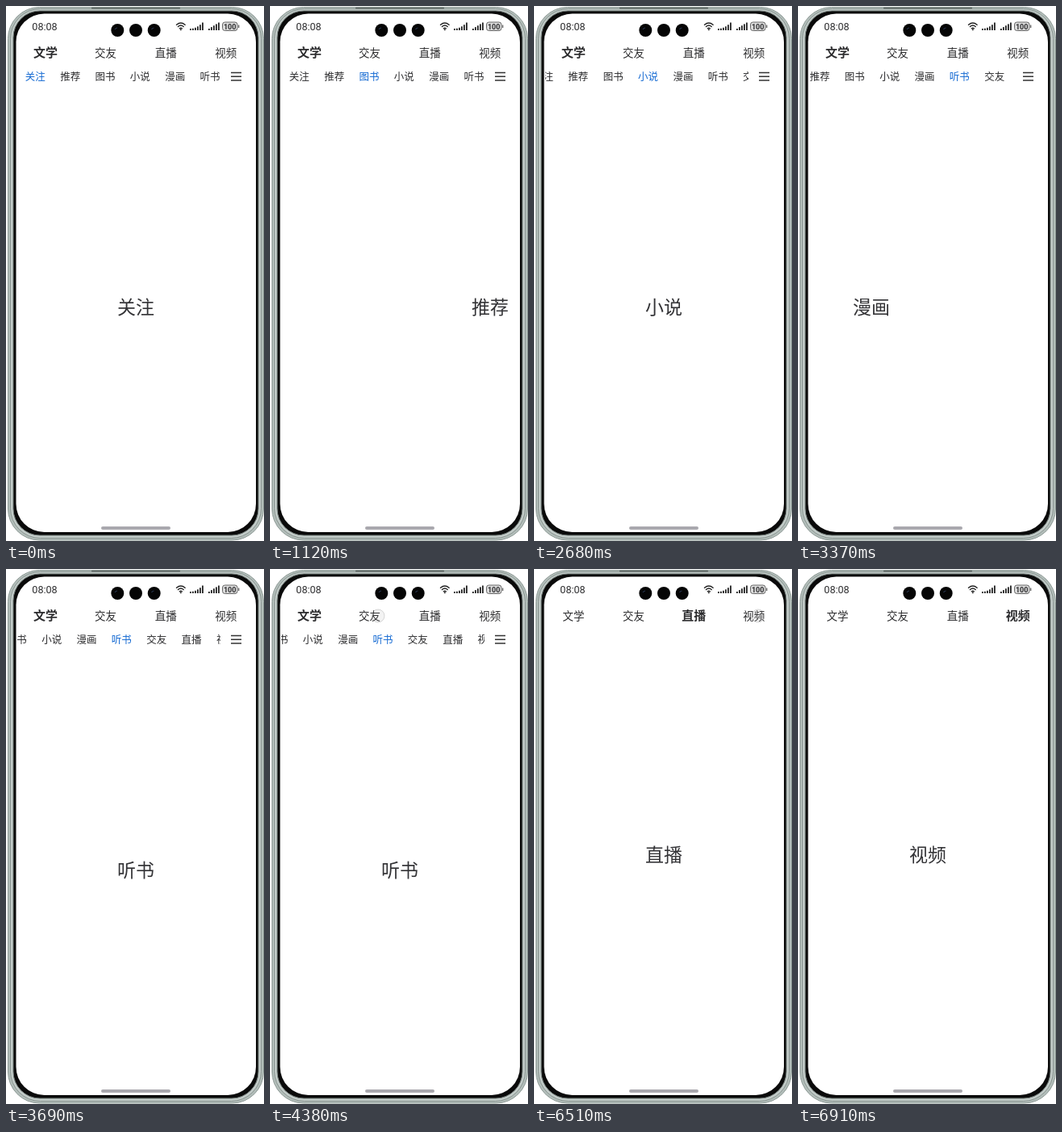
Recreate the animation shown at these times as an HTML page. Size 320 by 662 pixels, loop 7.87 s.

```html
<!DOCTYPE html>
<html lang="zh-CN">
<head>
<meta charset="utf-8">
<style>
  html, body { margin: 0; width: 100%; height: 100%; overflow: hidden; background: #fff; }
  svg { display: block; width: 320px; height: 662px; }
  text { font-family: "Noto Sans CJK SC", "Noto Sans CJK", "Noto Sans", sans-serif; text-anchor: middle; fill: #2c2c2e; }
  .status { font-family: Roboto, sans-serif; }
  .top { font-size: 13.5px; }
  .top.on { font-size: 15px; font-weight: 600; }
  .sub { font-size: 12.5px; }
  .sub.on { fill: #1268d2; }
  .title { font-size: 23px; fill: #333336; }
</style>
</head>
<body>
<svg viewBox="0 0 320 662">
  <defs>
    <clipPath id="screenClip"><rect x="12.5" y="9.5" width="297.5" height="641.5" rx="35"/></clipPath>
    <clipPath id="paneClip"><rect x="12" y="9" width="298" height="643"/></clipPath>
    <clipPath id="stripClip"><rect x="14" y="72" width="252" height="30"/></clipPath>
    <filter id="soft"><feGaussianBlur stdDeviation=".7"/></filter>
  </defs>

  <g id="body">
    <rect x="2.5" y="1.5" width="317" height="659.5" rx="39" fill="#b3beba" stroke="#8d9995"/>
    <rect x="5.5" y="3.5" width="311" height="655" rx="37" fill="#c3ccc9" stroke="#7b8783" stroke-width=".8"/>
    <rect x="9" y="6" width="304" height="649" rx="33" fill="#0a0a0a" stroke="#6d7673" filter="url(#soft)"/>
    <rect x="106" y="1.5" width="110" height="2.5" rx="1" fill="#6d7673"/>
    <rect x="12.5" y="9.5" width="297.5" height="641.5" rx="35" fill="#fff" filter="url(#soft)"/>
  </g>

  <g clip-path="url(#screenClip)">
    <g id="panes">
      <g clip-path="url(#paneClip)">
        <g clip-path="url(#stripClip)"><g id="strip"></g></g>
        <path d="M279 82.5h13M279 87.2h13M279 92h13" stroke="#333" stroke-width="1.4"/>
        <g id="pages"></g>
      </g>
    </g>
    <g id="topTabs"></g>
    <circle id="touch" r="8" fill="#888" fill-opacity=".1" stroke="#999" stroke-opacity=".45" stroke-width=".8"/>
  </g>

  <g id="statusBar">
    <text class="status" x="48" y="30" font-size="12.6">08:08</text>
    <g fill="#050505">
      <circle cx="138.3" cy="30" r="8"/><circle cx="161" cy="30" r="8"/><circle cx="183.7" cy="30" r="8"/>
    </g>
    <path d="M135 29a4 4 0 0 1 3-2M180.500 29a4 4 0 0 1 3-2" fill="none" stroke="#27344d" stroke-width="1.2"/>
    <path d="M211.500 23.200q5.300-4.600 10.600 0M213.400 25.600q3.400-3 6.800 0M215.300 27.800q1.500-1.300 3 0"
      fill="none" stroke="#222" stroke-width="1.4" stroke-linecap="round"/>
    <circle cx="216.800" cy="29.300" r="1" fill="#222"/>
    <g id="signal" fill="#222"></g>
    <rect x="268.500" y="20" width="18.500" height="10.500" rx="3" fill="#dcdcdc" stroke="#666"/>
    <path d="M288.700 23.500v3.500" stroke="#666" stroke-width="1.300"/>
    <text class="status" x="277.700" y="28.600" font-size="9" font-weight="600">100</text>
  </g>
  <rect x="118" y="644" width="86" height="4" rx="2" fill="#a9a8ae"/>
</svg>

<script>
const LOOP = 7870, FRAME = 40, WIDTH = 298, MID = 161;
const TOP = ['文学', '交友', '直播', '视频'];
const SUB = ['关注', '推荐', '图书', '小说', '漫画', '听书', ...TOP.slice(1)];

// [start ms, target tab]
const subMoves = [[40, 1], [480, 0], [1120, 2], [2360, 3], [3330, 5]];
const topMoves = [[4500, 1], [5600, 2], [6630, 3]];
// [shown from, hidden at, x, y]
const touches = [
  [440, 480, 40, 88], [840, 1120, 127, 88], [1940, 2360, 169, 88], [3170, 3330, 231, 88],
  [4260, 4500, 134, 58], [5400, 5600, 205, 58], [6510, 6630, 278, 58]
];

const $ = id => document.getElementById(id);
function add(parent, tag, attrs, text = '') {
  const el = document.createElementNS('http://www.w3.org/2000/svg', tag);
  for (const key in attrs) el.setAttribute(key, attrs[key]);
  el.textContent = text;
  return parent.appendChild(el);
}

const subX = i => 36.3 + 43.35 * i;
const topTabs = TOP.map((s, i) => add($('topTabs'), 'text', { class: 'top', x: 49 + 74.6 * i, y: 63 }, s));
const subTabs = SUB.map((s, i) => add($('strip'), 'text', { class: 'sub', x: subX(i), y: 92 }, s));
SUB.forEach((s, i) => add($('pages'), 'text', { class: 'title', x: MID + WIDTH * i, y: 381 }, s));
TOP.slice(1).forEach((s, i) => add($('panes'), 'text', { class: 'title', x: MID + WIDTH * (i + 1), y: 362 }, s));
[[228, 6], [251, 5]].forEach(([x, n]) => {
  for (let i = 0; i < n; i++) {
    const h = 2 + 7.5 * (i / (n - 1)) ** (n - 4);
    add($('signal'), 'rect', { x: x + i * 3, y: 30 - h, width: 1.8, height: h });
  }
});

// cubic-bezier(.2, 0, .1, 1)
function ease(x) {
  if (x >= 1) return 1;
  let lo = 0, hi = 1;
  for (let i = 0; i < 24; i++) {
    const s = (lo + hi) / 2, r = 1 - s;
    if (.6 * s * r * r + .3 * s * s * r + s * s * s < x) lo = s; else hi = s;
  }
  return lo * lo * (3 - 2 * lo);
}
const slide = ms => ease(ms / 302);
const spring = ms => 1 - (1 + ms * .0123) * Math.exp(-ms * .0123);

// Value of a track at time t, and the tab it is heading for
function follow(moves, t, curve, pos = i => i) {
  let value = pos(0), tab = 0;
  for (const [start, target] of moves) {
    if (t < start) break;
    const ms = Math.floor((t - start) / FRAME) * FRAME + 50;
    value += (pos(target) - value) * curve(ms);
    tab = target;
  }
  return { value, tab };
}

const shift = (id, x) => $(id).setAttribute('transform', `translate(${x.toFixed(2)} 0)`);
const mark = (tabs, on) => tabs.forEach((el, i) => el.classList.toggle('on', i === on));

function draw(t) {
  const sub = follow(subMoves, t, slide), top = follow(topMoves, t, slide);
  const scroll = follow(subMoves, t, spring, i => Math.max(0, subX(i) - 140));
  shift('pages', -WIDTH * sub.value);
  shift('panes', -WIDTH * top.value);
  shift('strip', -scroll.value);
  mark(subTabs, sub.tab);
  mark(topTabs, top.tab);
  const hit = touches.find(([from, to]) => t >= from && t < to);
  $('touch').style.display = hit ? '' : 'none';
  if (hit) {
    shift('touch', hit[2]);
    $('touch').setAttribute('cy', hit[3]);
  }
}

const begin = performance.now();
function tick() {
  draw((performance.now() - begin) % LOOP);
  requestAnimationFrame(tick);
}
tick();
</script>
</body>
</html>
```
